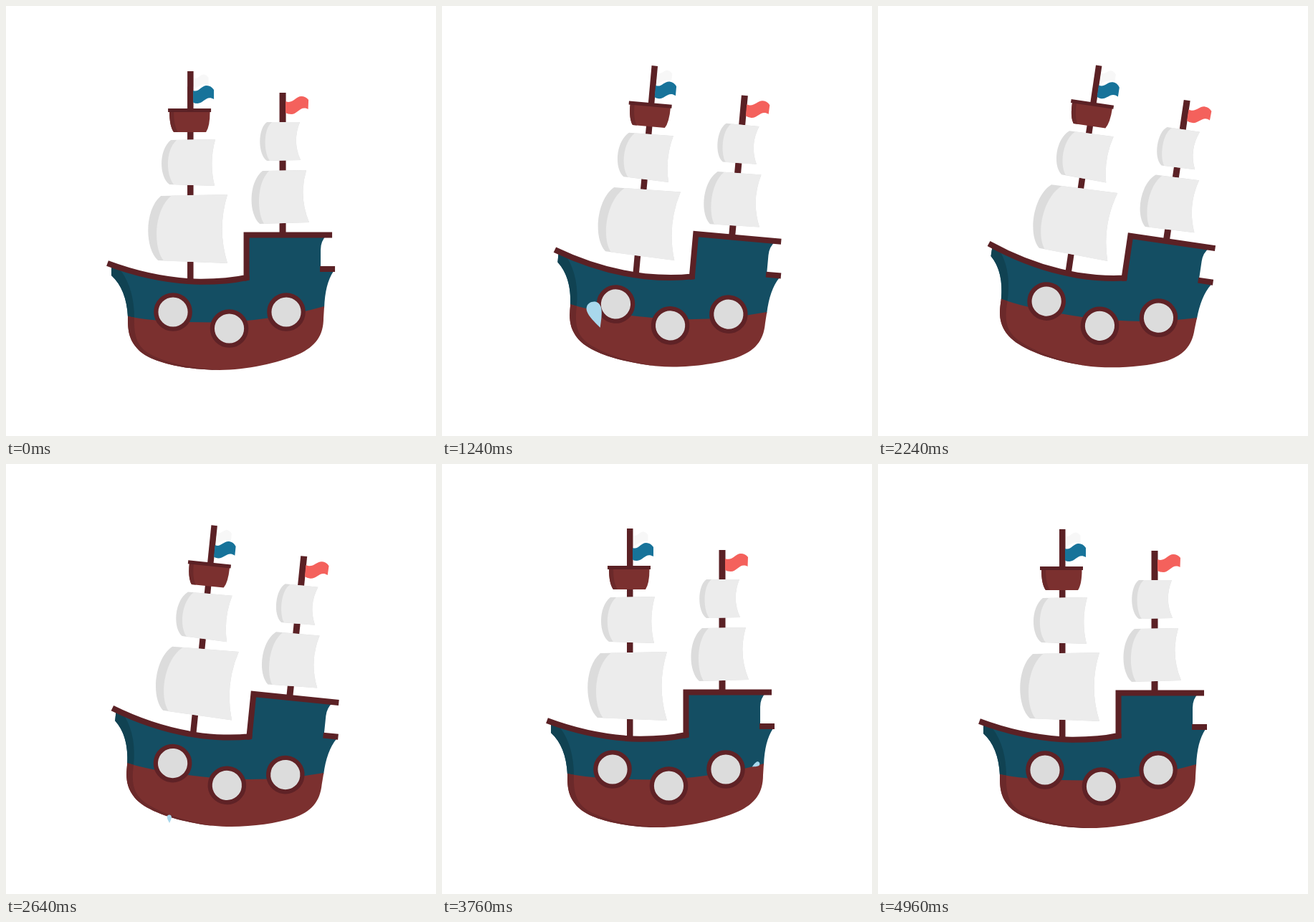
These frames come from a looping animation (600 px wide and 600 px high, 5000 ms). An HTML page:

```html
<!DOCTYPE html>
<html lang="en">
<head>
<meta charset="utf-8">
<title>Ship</title>
<style>
  html, body { margin: 0; width: 100%; height: 100%; overflow: hidden; background: #fff; }
  svg { display: block; width: 100vw; height: 100vh; }
  .dark { fill: #5b2125; }
  .wood { fill: #7b302f; }
  .woodShade { fill: #6b292a; }
  .teal { fill: #144e63; }
  .tealShade { fill: #104252; }
  .sail { fill: #ececec; }
  .sailShade { fill: #dcdcdc; }
  .rail { fill: none; stroke: #5b2125; stroke-width: 8; }
  .port circle { fill: #dcdcdc; stroke: #5f2226; stroke-width: 6.2; }
  .drop { fill: #a9d8ec; }
</style>
</head>
<body>
<svg viewBox="0 0 600 600">
  <g id="ship">
    <!-- masts -->
    <rect class="dark" x="253" y="91" width="8.5" height="292"/>
    <rect class="dark" x="381.5" y="121" width="9" height="197"/>

    <!-- flags -->
    <path fill="#f7f7f7" d="M262 101C269 102 270 95.500 276 95.500Q280 96 282.500 100L282.500 109C274 108 270 112 262 116Z"/>
    <path fill="#17739a" d="M261 118C269 121 272 111 280 111Q286 111 290 117L290 130C279 124 276 136 267 136Q263 136 261 134.500Z"/>
    <path fill="#f4615c" d="M390 133C400 137 404 126 412 126Q418 126 422 131L421.500 144C411 138 407 151 398 151Q393 151 390 149Z"/>

    <!-- crow's nest -->
    <path class="wood" d="M228 147H284.500Q284.500 168 279 176H234Q228 168 228 147Z"/>
    <path class="woodShade" d="M228 147H234Q234 168 240 176H234Q228 168 228 147Z"/>
    <rect class="dark" x="226" y="143" width="60" height="5"/>

    <!-- sails -->
    <path class="sailShade" d="M230 187L292 186Q283 218 291 251L228 249C213 238 213 200 230 187Z"/>
    <path class="sail" d="M238 187L292 186Q283 218 291 251L234 249C223 236 222 202 238 187Z"/>
    <path class="sailShade" d="M216 265L309 263Q294 311 309 359L212 355C193 338 193 284 216 265Z"/>
    <path class="sail" d="M231 264.500L309 263Q294 311 309 359L220 355.500C204 336 207 283 231 264.500Z"/>
    <path class="sailShade" d="M364 162H410Q399 189 411 215L364 216C351 207 351 171 364 162Z"/>
    <path class="sail" d="M371 162H410Q399 189 411 215L368 216C360 206 358 172 371 162Z"/>
    <path class="sailShade" d="M358 230L419 229Q408 266 423 302L354 304C338 290 338 246 358 230Z"/>
    <path class="sail" d="M367 230L419 229Q408 266 423 302L360 303.800C350 288 349 248 367 230Z"/>

    <!-- hull -->
    <path class="teal" d="M147 363C175 373 220 384 270 385Q310 385 336 379V320H447Q439 328 439 340V368L457 370Q445 388 444 421L400 445H200L170 434Q168 395 147 376Z"/>
    <path class="tealShade" d="M147 363L160 369Q179 395 179 436L170 434Q168 395 147 376Z"/>
    <path class="wood" d="M170 433Q210 441.500 290 441.500Q370 440 444 419L443 435C443 460 432 475 408 486C380 498 335 508 298 508C260 508 205 500 185 480C170 465 170 450 170 433Z"/>
    <path class="woodShade" d="M170 433L179 434.700C178 465 185 478 205 488C235 502 270 506 298 508C260 508 205 500 185 480C170 465 170 450 170 433Z"/>
    <path class="rail" d="M141.500 359C175 371.500 220 383.500 270 384.800Q308 385 335.500 379V319.500H455"/>
    <path class="dark" d="M331.500 376H339.500V382.500L333 384ZM438 363H459V371H438Z"/>

    <g class="port">
      <circle cx="233" cy="427" r="23.700"/>
      <circle cx="311.500" cy="450" r="23.700"/>
      <circle cx="391" cy="427" r="23.700"/>
    </g>
  </g>
  <g id="splash"></g>
</svg>
<script>
const LOOP = 5000;

// time, shift x, shift y, tilt
const SWAY = [
  [0, 0, 0, 0],
  [350, 24.5, 1, 2.7],
  [600, 23.2, 1.3, 4.25],
  [1080, 19.3, -3.5, 5],
  [1240, 20.6, -4.5, 5.15],
  [1700, 24, -6.5, 7],
  [2240, 20, -3.8, 8.4],
  [2800, 9, -1, 4.6],
  [3000, 7.3, 1.8, 3.5],
  [3200, 6.4, 3.6, 2.1],
  [3400, 5.5, 2.2, 0.9],
  [3760, 5, -1, 0],
  [4480, -1, -3, 0],
  [4720, -6, -2, 0],
  [4960, 0, 0, 0]
];

// from, ctrl, to: a quadratic arc; size: greatest length
const DROPS = [
  { born: 120, life: 850, size: 55, from: [223, 538], ctrl: [226, 493], to: [275, 437] },
  { born: 530, life: 960, size: 52, from: [221, 505], ctrl: [226, 445], to: [206, 412] },
  { born: 2580, life: 950, size: 57, from: [228, 503], ctrl: [228, 443], to: [206, 392] },
  { born: 2830, life: 1000, size: 54, from: [394, 511], ctrl: [398, 435], to: [444, 417] }
];

const ship = document.getElementById('ship');
const splash = document.getElementById('splash');

for (const drop of DROPS) {
  drop.el = document.createElementNS('http://www.w3.org/2000/svg', 'path');
  drop.el.setAttribute('class', 'drop');
  // unit drop, head up, tip down
  drop.el.setAttribute('d', 'M0 .5C-.12 .25 -.27 -.02 -.27 -.23C-.27 -.4 -.15 -.5 0 -.5C.15 -.5 .27 -.4 .27 -.23C.27 -.02 .12 .25 0 .5Z');
  splash.append(drop.el);
}

function slope(i, k) {
  const a = SWAY[Math.max(i - 1, 0)];
  const b = SWAY[Math.min(i + 1, SWAY.length - 1)];
  return (b[k] - a[k]) / (b[0] - a[0]);
}

function sway(t, k) {
  const end = SWAY.length - 1;
  if (t >= SWAY[end][0]) return SWAY[end][k];
  const i = SWAY.findIndex(row => row[0] > t) - 1;
  const a = SWAY[i], b = SWAY[i + 1];
  const span = b[0] - a[0];
  const u = (t - a[0]) / span, v = 1 - u;
  return v * v * (1 + 2 * u) * a[k] + u * u * (3 - 2 * u) * b[k]
    + span * u * v * (v * slope(i, k) - u * slope(i + 1, k));
}

function placeDrop({ el, born, life, size, from, ctrl, to }, t) {
  const p = (t - born) / life, q = 1 - p;
  const live = p > 0 && p < 1;
  el.setAttribute('visibility', live ? 'visible' : 'hidden');
  if (!live) return;
  const [x, y] = [0, 1].map(k => q * q * from[k] + 2 * q * p * ctrl[k] + p * p * to[k]);
  const [dx, dy] = [0, 1].map(k => q * (ctrl[k] - from[k]) + p * (to[k] - ctrl[k]));
  const turn = Math.atan2(dx, -dy) * 180 / Math.PI;
  el.setAttribute('transform', `translate(${x} ${y}) rotate(${turn}) scale(${size * Math.sin(Math.PI * p)})`);
}

function draw(t) {
  ship.setAttribute('transform', `translate(${sway(t, 1)} ${sway(t, 2)}) rotate(${sway(t, 3)} 300 300)`);
  DROPS.forEach(drop => placeDrop(drop, t));
}

const start = performance.now();
function tick() {
  draw((performance.now() - start) % LOOP);
  requestAnimationFrame(tick);
}
tick();
</script>
</body>
</html>
```
